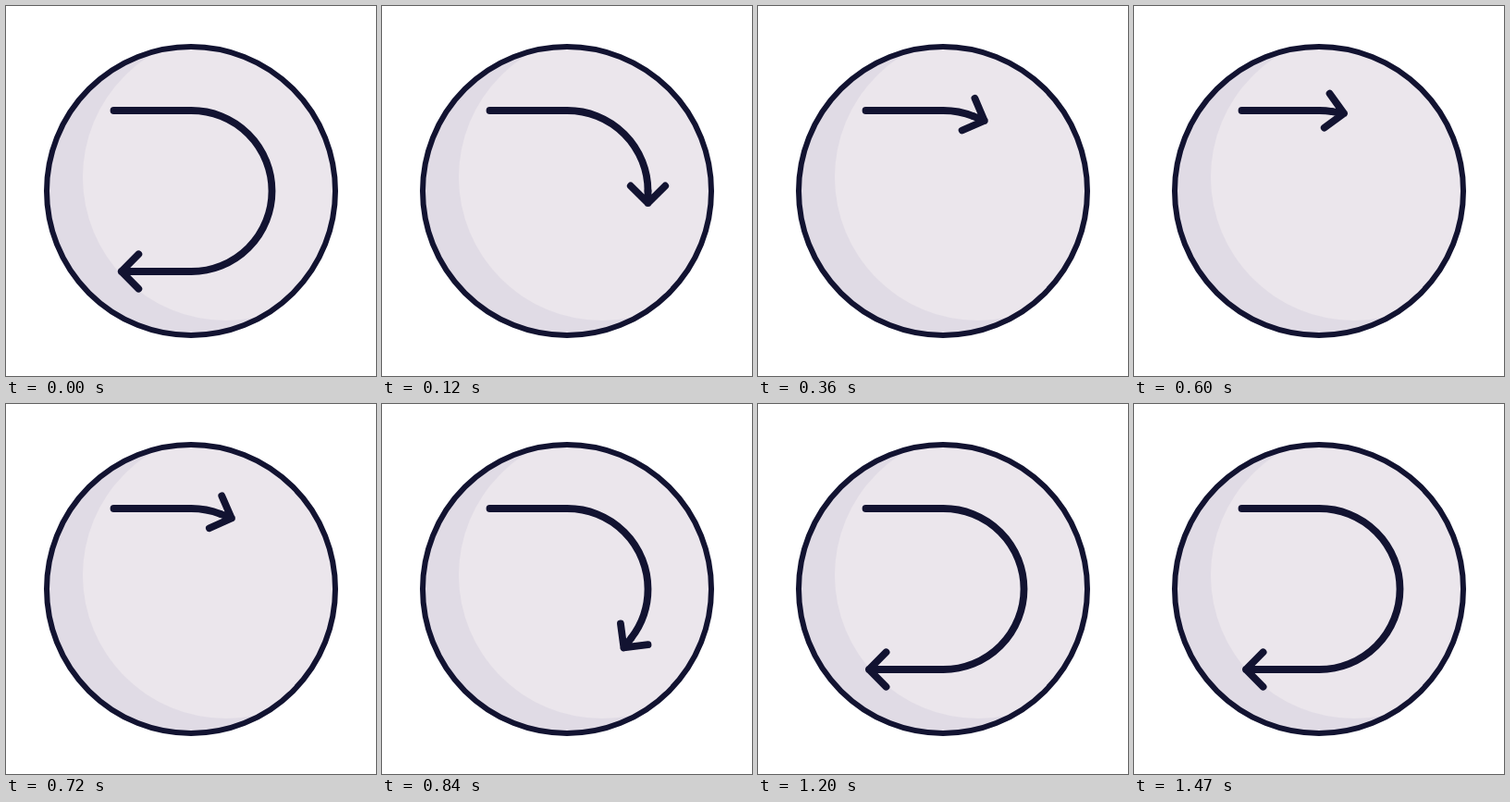
Write an HTML page without scripts that moves like this. It is 400x400 px and loops after 3830 ms.

```html
<!DOCTYPE html>
<html lang="en">
<head>
<meta charset="utf-8">
<title>Return arrow</title>
<style>
  @property --s {
    syntax: "<number>";
    inherits: true;
    initial-value: 423.3;
  }
  html, body {
    margin: 0;
    width: 100%;
    height: 100%;
    overflow: hidden;
    background: #fff;
  }
  svg { display: block; width: 400px; height: 400px; }

  /* --s is the distance travelled along the path */
  .turn {
    fill: none;
    stroke: #121331;
    stroke-width: 7.8;
    stroke-linecap: round;
    stroke-linejoin: round;
    animation: travel 3830ms linear infinite;
  }
  .line { stroke-dasharray: calc(var(--s) * 1px) 999px; }
  .head {
    offset-path: path("M116.5 113H200.5a87 87 0 0 1 0 174H116.5");
    offset-distance: calc(var(--s) * 1px);
    offset-rotate: auto;
  }
  @keyframes travel {
    0% { --s: 423.3; animation-timing-function: cubic-bezier(.1, .7, .4, 1); }
    15.666% { --s: 97.7; animation-timing-function: cubic-bezier(.75, 0, .22, 1); }
    28.198% { --s: 421.3; animation-timing-function: ease-in-out; }
    30.548% { --s: 427.3; animation-timing-function: ease-in-out; }
    33.681% { --s: 406; animation-timing-function: ease-in-out; }
    38.381%, 100% { --s: 423.3; }
  }
</style>
</head>
<body>
<svg viewBox="0 0 400 400">
  <clipPath id="disc"><circle cx="200" cy="200" r="156"/></clipPath>
  <g clip-path="url(#disc)">
    <rect width="400" height="400" fill="#e0dbe5"/>
    <circle cx="238" cy="185" r="155" fill="#ebe6ec"/>
  </g>
  <circle cx="200" cy="200" r="156" fill="none" stroke="#121331" stroke-width="6"/>
  <g class="turn">
    <path class="line" d="M116.5 113H200.5a87 87 0 0 1 0 174H116.5"/>
    <path class="head" d="M0 0H13M-5.5 -18.7L13 0L-5.5 18.7"/>
  </g>
</svg>
</body>
</html>
```
